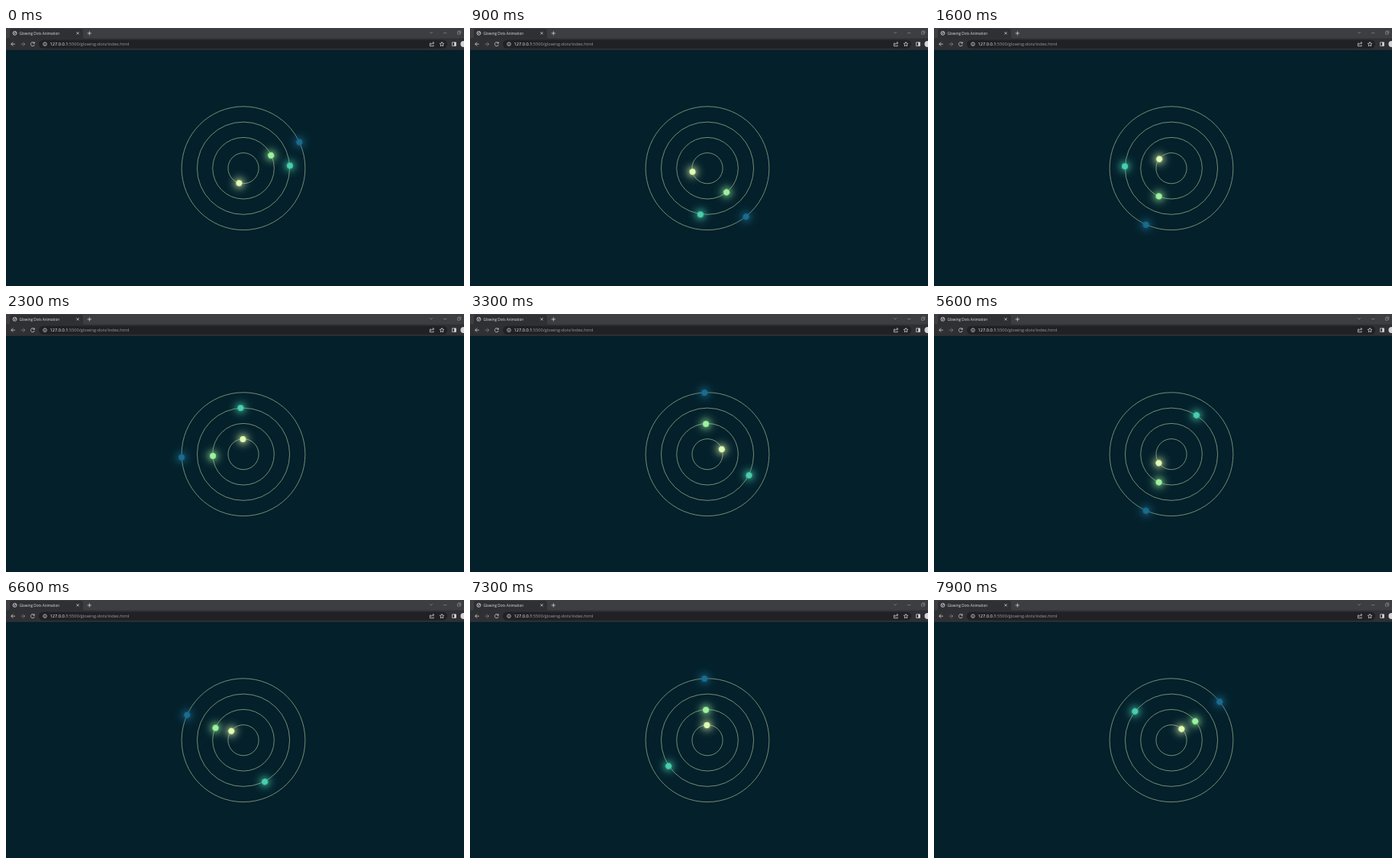
These frames come from a looping animation (600 by 338 pixels, 8000 ms). An HTML page:

```html
<!DOCTYPE html>
<html lang="en">
<head>
<meta charset="utf-8">
<title>Glowing Dots Animation</title>
<style>
  html, body { margin: 0; width: 100%; height: 100%; overflow: hidden; background: #03202b; }
  svg { display: block; position: absolute; left: 0; top: 0; }
  text { font-family: "Open Sans", "Noto Sans", sans-serif; }
  .icon { fill: none; stroke: #dcdde0; stroke-width: .75; }
  .dim { stroke: #85878b; }
  .ring { fill: none; stroke: #93a985; stroke-width: .8; }

  /* --a: starting angle, --v: turn per second */
  .orbit {
    position: absolute; left: 311px; top: 183.7px; width: 0; height: 0;
    animation: turn 8s infinite;
  }
  .orbit::before, .orbit::after {
    content: ""; position: absolute; border-radius: 50%;
  }
  .orbit::before {
    left: calc(var(--r) - 20px); top: -20px; width: 40px; height: 40px;
    background: radial-gradient(circle closest-side, var(--c) 15%, transparent);
    -webkit-mask: radial-gradient(circle closest-side, #0007 18%, #0005 35%, #0002 62%, #0000);
    mask: radial-gradient(circle closest-side, #0007 18%, #0005 35%, #0002 62%, #0000);
  }
  .orbit::after {
    left: calc(var(--r) - 4.1px); top: -4.1px; width: 8.2px; height: 8.2px;
    background: var(--c);
  }
  /* ten poses per second, the first one held slightly ahead */
  @keyframes turn {
    0%    { transform: rotate(calc(var(--a) + var(--v) * .05)); animation-timing-function: step-end; }
    1.25% { transform: rotate(calc(var(--a) + var(--v) * .1)); animation-timing-function: steps(79, end); }
    100%  { transform: rotate(calc(var(--a) + var(--v) * 8)); }
  }
</style>
</head>
<body>
<svg width="600" height="338" viewBox="0 0 600 338">
  <!-- browser bar -->
  <rect width="600" height="14" fill="#3d3e42"/>
  <path d="M2 14Q5 14 5 11V4Q5 1 8 1H98Q101 1 101 4V11Q101 14 104 14Z" fill="#2f3033"/>
  <rect y="13.5" width="600" height="15.3" fill="#2f3033"/>
  <rect x="43" y="15.6" width="535" height="11.2" rx="5.6" fill="#202124"/>

  <!-- tab -->
  <circle class="icon" cx="11.5" cy="6.8" r="2.5"/>
  <path class="icon" d="M9.6 5.6L11.5 6.6L10.8 8.8M12.3 4.6L12.6 6.2L13.8 7"/>
  <text x="17.5" y="8.5" font-size="4.7" fill="#dfe1e4">Glowing Dots Animation</text>
  <path class="icon" d="M92.4 5.2l3.2 3.2m0-3.2l-3.2 3.2M109.3 4.3v5.2M106.7 6.9h5.2"/>

  <!-- window buttons -->
  <path class="icon dim" d="M555.2 5.2l1.9 1.9l1.9-1.9M573 6.6h4.4"/>
  <path class="icon dim" d="M591.5 5h3.2v3.2h-3.2zM592.6 5v-1.1h3.2v3.2h-1.1"/>

  <!-- toolbar -->
  <path class="icon" d="M11.9 21.1H6.7M9.2 18.6L6.7 21.1L9.2 23.6"/>
  <path class="icon dim" d="M19.6 21.1h5.2M22.3 18.6l2.5 2.5l-2.5 2.5"/>
  <path class="icon" d="M36.9 19.6A2.5 2.5 0 1 0 37.3 21.9M37.3 18.3v1.9h-1.9"/>
  <circle class="icon" cx="51" cy="21.1" r="2.3"/>
  <path class="icon" d="M51 20.8v1.5M51 19.6v.6"/>
  <text x="57.5" y="23.1" font-size="5.65" fill="#9a9da1"><tspan fill="#f0f1f2">127.0.0.1</tspan>:5500/glowing-dots/index.html</text>
  <path class="icon" d="M557 20h-1.6v3.7h4.8v-1.3M557 22q.2-2.4 3.5-2.4M559.2 18l1.6 1.6l-1.6 1.6"/>
  <path class="icon" d="M571 18.3l.85 1.8l2 .25l-1.45 1.4l.35 2l-1.75-1l-1.75 1l.35-2l-1.45-1.4l2-.25z"/>
  <path class="icon" d="M584.6 18.8h4.8v4.6h-4.8z"/>
  <path d="M587.2 18.8h2.2v4.6h-2.2z" fill="#dcdde0"/>
  <circle cx="599.5" cy="21.1" r="4" fill="#d4d6d8"/>

  <!-- tracks -->
  <g class="ring" transform="translate(311 183.7)">
    <circle r="20.1"/>
    <circle r="40.3"/>
    <circle r="60.6"/>
    <circle r="80.9"/>
  </g>
</svg>
<div class="orbit" style="--r: 80.9px; --a: -29.7deg; --v: 90deg; --c: #1a6b8e"></div>
<div class="orbit" style="--r: 60.6px; --a: -9.4deg; --v: 120deg; --c: #48cfae"></div>
<div class="orbit" style="--r: 40.3px; --a: -29.8deg; --v: 90deg; --c: #9cf29d"></div>
<div class="orbit" style="--r: 20.1px; --a: 102.6deg; --v: 72deg; --c: #e0fbb2"></div>
</body>
</html>
```
